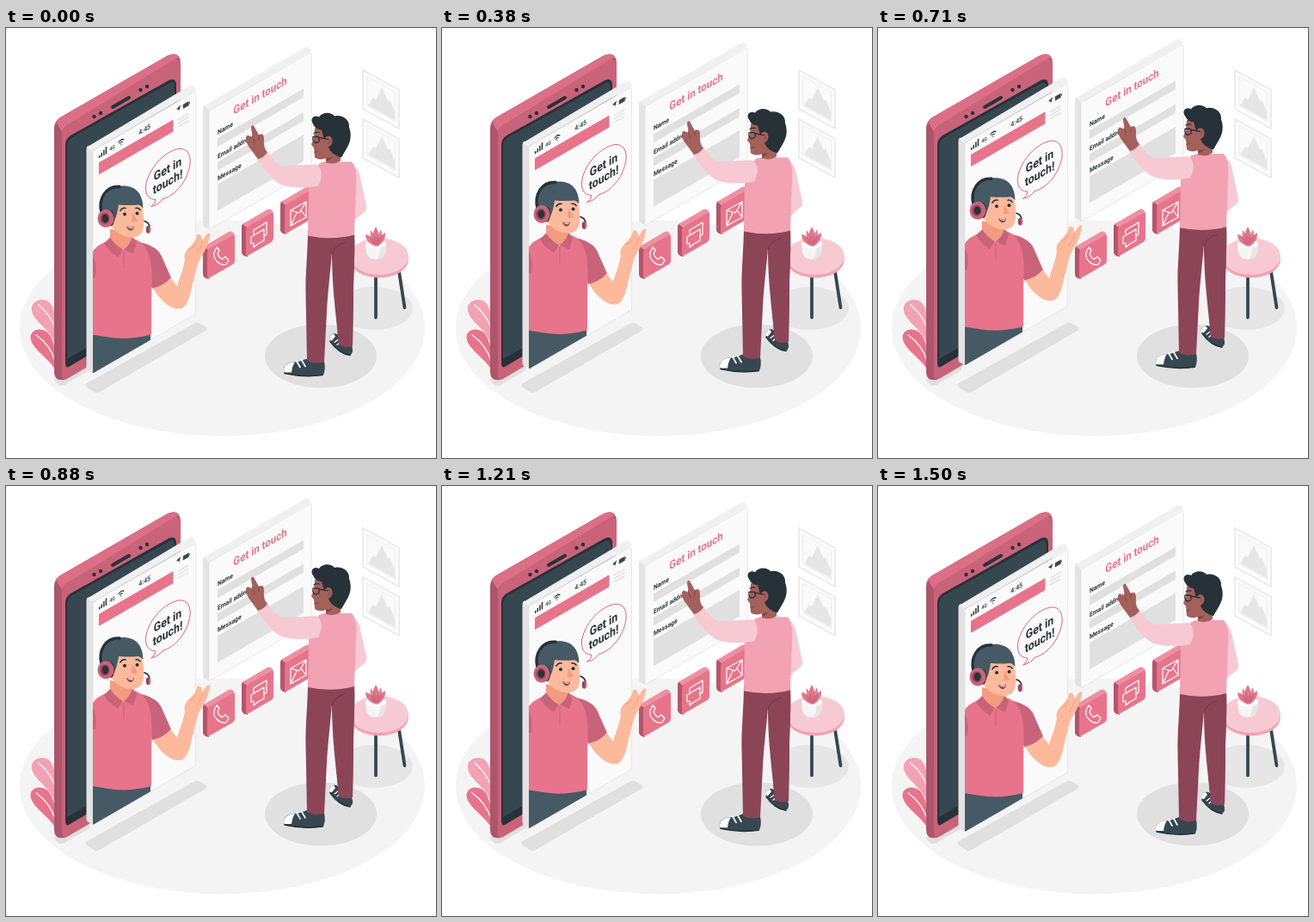
An HTML page for the animation above (1540 ms loop, 500 px wide and 500 px high).

```html
<!DOCTYPE html>
<html lang="en">
<head>
<meta charset="utf-8">
<title>Get in touch</title>
<style>
  html, body { margin: 0; width: 100%; height: 100%; overflow: hidden; background: #fff; }
  svg { display: block; width: 100vw; height: 100vh; }
  text { font: 700 14.2px Roboto, sans-serif; text-anchor: middle; fill: #263238; }
  .small { font-size: 7.8px; font-weight: 600; text-anchor: start; }
  .status { font-size: 8px; font-weight: 500; }
  .line { fill: none; stroke-linecap: round; stroke-linejoin: round; }
  .shadow { fill: #e0e0e0; }
  .pink { fill: #e7748b; }
  .rose { fill: #c9637a; }
  .blush { fill: #f2a2b3; }
  .pale { fill: #f7cad3; }
  .wine { fill: #8b4557; }
  .ink { fill: #263238; }
  .slate { fill: #37474f; }
  .steel { fill: #455a64; }
  .skin { fill: #fcb99c; }
  .tan { fill: #f29b80; }
  .brown { fill: #a4605b; }
  .umber { fill: #7d4643; }
  .white { fill: #fff; }
  .paper { fill: #fafafa; stroke: #e0e0e0; stroke-width: .7; }
  .edge { fill: #e3e3e3; }
  .top { fill: #f0f0f0; }
  .field { fill: #e0e0e0; }
</style>
</head>
<body>
<svg viewBox="0 0 500 500">
  <defs>
    <clipPath id="screenClip"><path d="M101 100H300V287L101 402Z"/></clipPath>
    <g id="button">
      <path fill="#b3566c" d="M-5 -1Q-5 -4 -2 -5L2 0V34L-2 33Q-5 31 -5 29Z"/>
      <path fill="#ee90a2" d="M-4 -4L24 -20.500Q27 -22 29 -21L32 -18L1 0Z"/>
      <rect class="pink" width="37" height="34" rx="3" transform="matrix(.866 -.5 0 1 0 0)"/>
    </g>
    <g id="picture">
      <path fill="#fff" stroke="#e8e8e8" stroke-width="1.600" d="M0 0L42 23V68L0 45Z"/>
      <path fill="#fafafa" stroke="#ebebeb" d="M4.500 7L38 25.500V60L4.500 41.500Z"/>
      <path fill="#e6e6e6" d="M6 41L12 32L15 34L22 20L29 36L31 34L37 48V58Z"/>
    </g>
  </defs>

  <ellipse cx="251.500" cy="349" rx="235.500" ry="125.500" fill="#f4f4f4"/>
  <ellipse class="shadow" cx="366" cy="381.500" rx="65" ry="37"/>
  <ellipse cx="428" cy="326" rx="45" ry="25" fill="#e6e6e6"/>
  <path class="shadow" d="M94 413L218 344Q221 342 224 343L233 348Q235 350 232 352L109 423Q105 425 102 423L94 418Q91 415 94 413Z"/>
  <path class="shadow" d="M55 409L62 406L97 388V398L68 415Q64 417 61 415Z"/>
  <use href="#picture" x="415" y="49"/>
  <use href="#picture" x="415" y="120" transform="translate(0 -14)"/>

  <!-- Leaves -->
  <path class="blush" d="M58 372C55 352 33 343 30 329C28 318 40 313 49 318C57 323 58 340 60 372Z"/>
  <path class="pink" d="M62 408C56 386 34 378 29 363C26 352 38 347 47 353C58 361 58 385 62 408Z"/>
  <path class="line" stroke="#fff" stroke-width="1.200" d="M38 322Q52 334 57 349M35 357Q51 368 57 387"/>

  <!-- Phone -->
  <path fill="#ac566b" d="M56 117Q56 108 63 104L188 32Q203 26 203 42V330L68 409Q56 411 56 400Z"/>
  <path fill="#dc6e86" d="M58 109Q60 106 63 104L188 32Q197 28 201 34L71 113Q66 116 65 121Z"/>
  <path class="rose" d="M65 123Q65 116 71 113L193 38Q203 33 203 44V330L71 408Q65 411 65 403Z"/>
  <path class="ink" d="M69 136Q69 129 75 125L189 61Q198 57 198 67V320L73 394Q69 396 69 389Z"/>
  <path class="slate" d="M71 137Q71 131 77 127L190 64Q196 61 196 69V312L71 385Z"/>
  <path class="line" stroke="#263238" stroke-width="4" d="M124 92L143 81"/>
  <g class="ink">
    <circle cx="102.500" cy="103" r="2.200"/><circle cx="110" cy="99" r="2.200"/>
    <circle cx="156.500" cy="72" r="2.200"/><circle cx="164" cy="68" r="2.200"/>
  </g>

  <!-- Contact form -->
  <g class="float">
    <path class="edge" d="M229 94Q229 91 231 90L237 97V235L231 232Q229 231 229 229Z"/>
    <path class="top" d="M230 91L348 23Q350 22 352 23L355 27L236 97Z"/>
    <g transform="matrix(.866 -.5 0 1 236 97)">
      <rect class="paper" width="137.500" height="138" rx="2"/>
      <text class="pink" x="68.700" y="21" style="font-size:13.300px">Get in touch</text>
      <text class="small" x="11.500" y="33.500">Name</text>
      <path class="field" d="M11.500 37.500H127v10H11.500ZM11.500 65H127v10H11.500ZM11.500 91H127v31H11.500Z"/>
      <text class="small" x="11.500" y="61.500">Email address</text>
      <text class="small" x="11.500" y="87">Message</text>
    </g>
  </g>

  <!-- Contact buttons -->
  <use href="#button" x="234" y="258"/>
  <use href="#button" x="279" y="232"/>
  <use href="#button" x="324" y="206"/>
  <g class="line" stroke="#fff" stroke-width="1.200">
    <path d="M242 261C240 269 249 277 256 275L259 270L255 266L251 269C248 267 247 265 246 263L248 258L245 255Z"/>
    <path d="M288 240V235L303 226V240L300 242"/>
    <path d="M285 243L300 234V247L293 251L288 255V250L285 251Z"/>
    <path d="M331 212L349 202V220L331 230ZM331 212L341 215L349 202M331 230L338 215M349 220L343 212"/>
  </g>

  <!-- Floating screen with the agent -->
  <g class="float">
    <path class="edge" d="M93.500 141Q93.500 138 96 137L102 143V402L96 399Q93.500 398 93.500 395Z"/>
    <path class="top" d="M94 139L213 68Q216 66 218 68L221 73L101 143Z"/>
    <g transform="matrix(.866 -.5 0 1 101 143)">
      <rect class="paper" width="138" height="259" rx="2.500"/>
      <path class="ink" d="M8 10h1.700v3H8ZM11 8.500h1.700V13H11ZM14 6.500h1.700V13H14ZM17 4.500h1.700V13H17Z"/>
      <text class="status" x="26" y="12" style="font-size:6px">4G</text>
      <path class="line" stroke="#263238" stroke-width="1.200" d="M34.500 8Q38 5 41.500 8M36.500 10Q38 8 39.500 10M38 12v.2"/>
      <text class="status" x="69.500" y="13">4:45</text>
      <path class="ink" d="M112 8L118 6L115.500 12L115 9.500Z"/>
      <path class="slate" d="M121 7h8v5h-8ZM129.500 8.500h1v2h-1Z"/>
      <rect class="pink" x="8" y="18" width="100" height="14" rx="1"/>
      <path class="line" stroke="#dcdcdc" stroke-width="1.300" d="M114.500 21.500H128M114.500 25.500H128M114.500 29.500H128"/>
      <text x="100.500" y="76.500">Get in</text>
      <text x="100.500" y="91.500">touch!</text>
    </g>
    <path class="line" stroke="#e0627d" d="M169 208Q174 205 174 200C164 200 161 191 163 181C167 163 184 144 201 141C211 140 215 148 214 159C211 178 198 195 182 199.500Q178 206 169 208Z"/>

    <g clip-path="url(#screenClip)">
      <path class="steel" d="M100 350H168V370L100 410Z"/>
      <path class="rose" d="M150 249C166 250 178 258 181 266L192 291Q185 300 171 304L158 285Z"/>
      <path class="pink" d="M100 262C104 254 112 251 120 247L146 245C158 248 164 255 167 267C171 280 169 300 169 320V357Q141 364 119 360L100 357Z"/>
      <path class="rose" d="M100 264Q106 272 104 290L100 292Z"/>
      <path class="tan" d="M121 234L146 240V249Q141 258 135 260Q125 255 121 247Z"/>
      <path class="rose" d="M121 244Q128 254 136 258L130 267Q118 259 114 251ZM147 243L152 250L148 263L137 258Q145 252 147 243Z"/>
      <path class="line" stroke="#c9637a" d="M137 260V279"/>
    </g>
    <path class="skin" d="M171 303C178 315 190 328 202 327C211 326 214 312 217 298C221 284 222 273 228 265C233 258 236 248 237.500 240C235 237 231 243 228 249C229 243 226 239 222 241C222 246 217 252 213 256C207 261 207 267 208 270C206 282 201 293 199 301L191.500 291Q184 300 171 303Z"/>
    <path class="line" stroke="#f29b80" stroke-width=".9" d="M222 263Q228 256 229 248M213 257Q219 257 221 251"/>

    <path class="skin" d="M122 207L153 201C159 207 160 214 160 224C161 238 156 244 147 244C136 244 125 238 121 227Z"/>
    <path class="steel" d="M110 213C110 195 121 184 136 184C151 184 159 193 159.500 210Q157 207 154 206Q143 207 131 206C130 213 128 222 125 226L114 229Z"/>
    <path class="line" stroke="#263238" stroke-width="3.400" d="M111 215C107 199 116 184 132 185"/>
    <ellipse class="ink" cx="122" cy="222" rx="4" ry="9"/>
    <ellipse class="rose" cx="116" cy="222" rx="9.500" ry="10.500"/>
    <ellipse class="wine" cx="115" cy="222" rx="5.500" ry="6.500"/>
    <ellipse class="ink" cx="115.500" cy="222" rx="3.700" ry="4.700"/>
    <circle class="ink" cx="138" cy="217" r="2"/><circle class="ink" cx="152.500" cy="216" r="2"/>
    <path class="line" stroke="#263238" stroke-width="1.600" d="M133 213Q135 209 139 210M151 210Q154 209 156 212"/>
    <path class="tan" d="M147 215L153 225Q151 227 146 226Z"/>
    <path class="wine" d="M140 231Q145 233 149 231Q148 237 144 236Q141 235 140 231Z"/>
    <path class="white" d="M141 231.500Q145 233 148 232L147 233.500Q143 234 141 231.500Z"/>
    <path class="line" stroke="#263238" stroke-width="1.700" d="M161 225Q167 227 167 233"/>
    <ellipse class="rose" cx="165.500" cy="235" rx="2.800" ry="4.400"/>
    <path class="wine" d="M163 235Q163 230 166 231V239Q163 239 163 235Z"/>
  </g>

  <!-- Side table -->
  <path class="line" stroke="#37474f" stroke-width="3.800" d="M430 288V336.500M457 283L463.500 325"/>
  <ellipse class="blush" cx="434" cy="269" rx="34" ry="21.500"/>
  <ellipse class="pale" cx="434" cy="265.500" rx="34" ry="21.500"/>
  <path fill="#f5f5f5" d="M418 251H442C442 263 439 269 430 269C421 269 418 263 418 251Z"/>
  <path fill="#e6e6e6" d="M435 255L442 251C442 263 439 269 431 269Q436 264 435 255Z"/>
  <ellipse class="white" cx="430" cy="251" rx="12" ry="5"/>
  <path class="pink" d="M429 252Q424 240 430 231Q436 240 431 252ZM428 253Q418 249 418 240Q427 241 429 252ZM431 253Q432 242 441 238Q442 248 432 254Z"/>
  <path class="rose" d="M429 254Q422 246 424 235Q431 242 430 254ZM430 254Q430 243 436 234Q440 245 431 254Z" opacity=".75"/>

  <!-- Visitor -->
  <g class="float">
    <path class="slate" d="M377 358Q381 354 386 357L389 368L402 370Q405 378 400 381Q389 380 384 372Q376 366 376 362Z"/>
    <path class="white" d="M376 362Q377 356 381 356L383 359L379 364Q376 364 376 362Z"/>
    <path class="line" stroke="#fff" stroke-width="1.200" d="M382 366L386 363M385 369L388 366"/>
    <path class="line" stroke="#263238" stroke-width="1.500" d="M377 365Q387 379 400 381"/>
    <path class="slate" d="M323 396Q326 388 339 389L350 385L370 388Q372 397 369 404Q354 407 344 405L326 403Q322 401 323 396Z"/>
    <path class="white" d="M323 397Q325 389 336 389Q333 393 332 401L325 401Q322 400 323 397Z"/>
    <path class="line" stroke="#fff" stroke-width="1.700" d="M338 388L342 395M344 387L348 394"/>
    <path class="line" stroke="#263238" stroke-width="1.700" d="M324 402Q345 407 368 404"/>

    <path fill="#7b3c4d" d="M373 240H405C406 265 404 285 404 310L403 370Q395 373 387 369L383 320L379 264Z"/>
    <path class="wine" d="M351 236H405C406 265 404 285 404 310L403 370Q395 373 387 369L382 320Q379 290 379 262C377 285 374 310 373 330L370 389Q358 392 350 387L348.500 310C348 285 351 260 351 236Z"/>
    <path class="line" stroke="#6d3544" d="M379 263Q382 253 394 250"/>

    <path class="pale" d="M394 157Q408 159 411 170L419 207Q420 212 416 215L405 224Z"/>
    <path class="blush" d="M364 158Q376 153 386 156L402 156Q409 164 407 184L405 241Q379 248 351 242L352 185Z"/>
    <path class="pale" d="M304 144Q311 157 321 161L362 159Q371 169 363 184Q340 189 321 183Q309 179 292 153Z"/>
    <path class="brown" d="M293 153L282 138Q276 128 281 125L287 128L285 117Q285 113 288 114L294 125Q300 121 300 130Q299 140 304 145Q300 151 293 153Z"/>
    <path class="line" stroke="#7d4643" stroke-width=".8" d="M287 128L289 134M294 125L294 131"/>

    <path class="brown" d="M372 143L389 142V155Q382 160 372 157Z"/>
    <path class="umber" d="M372 151L381 147Q379 154 372 155Z"/>
    <path class="brown" d="M359 117Q370 112 383 120L386 145Q379 152 372 152Q364 155 359 151L358 140L355 136L358 129Z"/>
    <path class="ink" d="M357 112C353 106 358 101 364 104C368 98 378 98 382 103C391 101 400 107 399 116C402 124 401 132 397 139L390 151C384 150 377 145 375 139Q379 137 378 128Q373 124 370 130L367 119Q360 119 357 112Z"/>
    <ellipse class="brown" cx="375" cy="132" rx="4.500" ry="6"/>
    <path class="line" stroke="#7d4643" stroke-width=".9" d="M374.500 129Q378.500 132 374.500 135"/>
    <path class="line" stroke="#263238" stroke-width="1.300" d="M357 127H363.500Q366 134 360 134Q356 133 357 127ZM364 128L374 130"/>
    <path class="line" stroke="#263238" stroke-width="1.200" d="M358 123Q361 121 364 122"/>
    <path class="line" stroke="#7d4643" stroke-width="1.200" d="M359 145L363 144"/>
  </g>
</svg>
<script>
  const LOOP = 1540, LEAD = 40, RISE = 10;
  const floating = document.querySelectorAll('.float');

  // Linear rise and fall, highest halfway through the cycle.
  function draw(now) {
    const phase = (now + LEAD) % LOOP / LOOP;
    const lift = RISE * (1 - Math.abs(2 * phase - 1));
    floating.forEach(part => part.setAttribute('transform', `translate(0 ${-lift})`));
  }

  let start;
  function tick(now) {
    start ??= now;
    draw(now - start);
    requestAnimationFrame(tick);
  }
  draw(0);
  requestAnimationFrame(tick);
</script>
</body>
</html>
```
